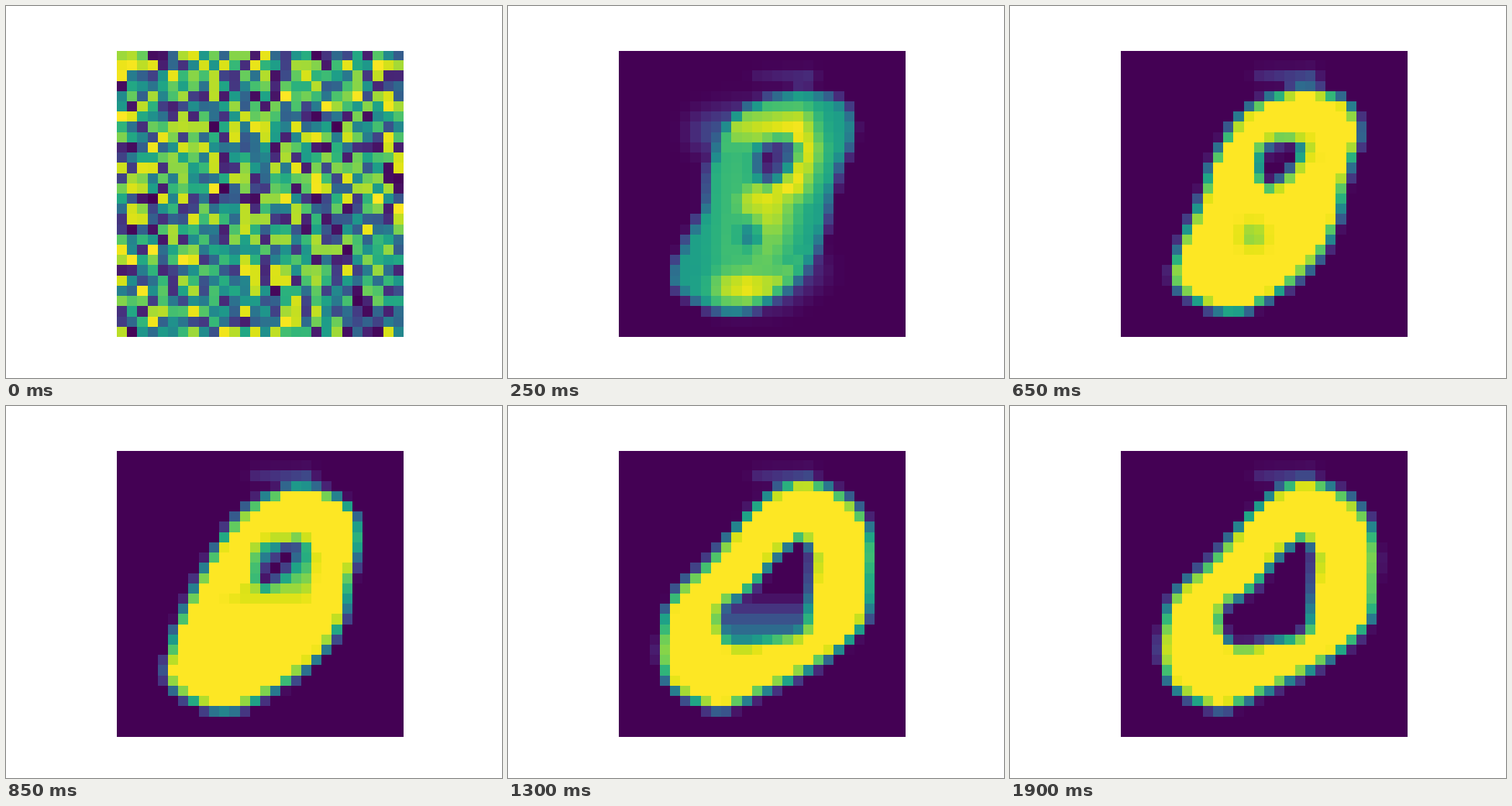
A matplotlib script that plays this animation: 640 by 480 pixels, repeating every 2.3 s.

```python
import numpy as np
import matplotlib.pyplot as plt
from matplotlib.animation import FuncAnimation
from matplotlib.path import Path

N = 28          # cells per side
FRAMES = 46
STEP = 50       # ms
EDGE = 1.35     # width of the soft rim, in cells
BLURRY, SHARP, DONE = 3, 9, 27   # steps at which each phase ends

X, Y = np.meshgrid(np.arange(N) + 0.5, np.arange(N) + 0.5)
CELLS = np.column_stack([X.ravel(), Y.ravel()])


def ramp(t, start, end):
    return np.clip((t - start) / (end - start), 0, 1)


def mix(a, b, w):
    return a + (b - a) * w


def spline(pts, n=24):
    """Closed Catmull-Rom curve through pts."""
    p = np.asarray(pts, float)
    a, c, d = np.roll(p, 1, 0), np.roll(p, -1, 0), np.roll(p, -2, 0)
    t = (np.arange(n) / n)[:, None, None]
    curve = 0.5 * (2 * p + (c - a) * t + (2 * a - 5 * p + 4 * c - d) * t**2
                   + (3 * p - a - 3 * c + d) * t**3)
    return curve.transpose(1, 0, 2).reshape(-1, 2)


def fill(pts):
    """Soft-edged coverage of a closed curve on the cell grid."""
    curve = spline(pts)
    dist = np.sqrt(((CELLS[:, None] - curve) ** 2).sum(2)).min(1)
    dist[Path(curve).contains_points(CELLS)] *= -1
    return np.clip(0.5 - dist / EDGE, 0, 1).reshape(N, N)


def spot(x, y, size, strength):
    return strength * np.exp(-((X - x) ** 2 + (Y - y) ** 2) / (2 * size**2))


def stroke(pts, size):
    """Blurred pen stroke through (x, y, strength) points."""
    p = np.array(pts, float)
    t = np.linspace(0, len(p) - 1, 16 * len(p))
    cols = [np.interp(t, np.arange(len(p)), col) for col in p.T]
    return np.max([spot(x, y, size, s) for x, y, s in zip(*cols)], axis=0)


# Outline of the narrow first digit and of the wide final one, point for point.
NARROW = np.array([(16, 4.3), (18.7, 4), (22, 5.3), (22.9, 8.2), (21.3, 12.2),
                   (20.3, 16.5), (19, 20.3), (15, 24.2), (10.5, 25.7), (5.4, 22.9),
                   (6.4, 19), (8.4, 15.2), (9, 10.9), (11.6, 6.3)])
WIDE = np.array([(16.2, 3.4), (18.8, 2.95), (22.6, 4.9), (24.6, 8), (24.85, 12.5),
                 (24.2, 16.8), (20.2, 20.5), (14, 23.6), (9.5, 25.2), (5, 22.9),
                 (3.95, 19), (5.2, 14.2), (9, 10.6), (13, 5.9)])

EYE = fill([(15.5, 8.8), (17.3, 9.2), (17, 11.3), (14.8, 13.2), (13.6, 12), (13.8, 9.6)])
HOLE = fill([(17.4, 8.8), (18.8, 9.6), (18.9, 12), (18.6, 15.5), (18, 17.7),
             (15.5, 18.55), (11.8, 19.1), (10.2, 18.3), (10, 15.5), (12.8, 13.5),
             (15.3, 10.5)])
DIMPLE = spot(12.9, 18.1, 0.8, 0.6)

HOOK = stroke([(9, 8, 0.5), (12, 7.6, 0.73), (17.3, 7.5, 0.97), (18, 9.8, 0.95),
               (16.8, 13, 1), (13.2, 14.9, 0.85)], 1.45)
STEM = stroke([(14.8, 15.5, 0.82), (14, 20.5, 0.45)], 1.9)
FOOT = stroke([(10.8, 23.1, 0.8), (12.5, 23.1, 0.97), (15.5, 22.9, 0.7),
               (18.5, 21.5, 0.3)], 1.35)
HAZE = stroke([(11.3, 10.5, 0.28), (11.3, 20, 0.34)], 1.7)
BLUR = np.max([HOOK, STEM, FOOT, HAZE], axis=0)

HALO = stroke([(13.5, 2.5, 0.1), (18.7, 2.5, 0.22)], 0.5)
NOISE = np.random.default_rng(28).random((N, N))


def digit(i):
    body = fill(mix(NARROW, WIDE, ramp(i, SHARP, DONE)))
    opening = ramp(i, Y + 2, Y + 12)     # the hole opens from the top down
    hole = mix(EYE, HOLE, opening)
    hole = np.maximum(hole, DIMPLE * (1 - ramp(i, SHARP, SHARP + 6)))
    return np.maximum(body * (1 - hole), HALO)


def picture(i):
    if i == 0:
        return NOISE
    focus = 1 - (1 - ramp(i, BLURRY, SHARP)) ** 2
    return mix(BLUR, digit(i), focus)


fig, ax = plt.subplots(figsize=(6.4, 4.8), dpi=100)
ax.axis("off")
image = ax.imshow(NOISE, cmap="viridis", vmin=0, vmax=1, interpolation="nearest")


def update(i):
    image.set_data(picture(i))
    return [image]


anim = FuncAnimation(fig, update, frames=FRAMES, interval=STEP,
                     repeat=True, repeat_delay=0)
plt.show()
```
